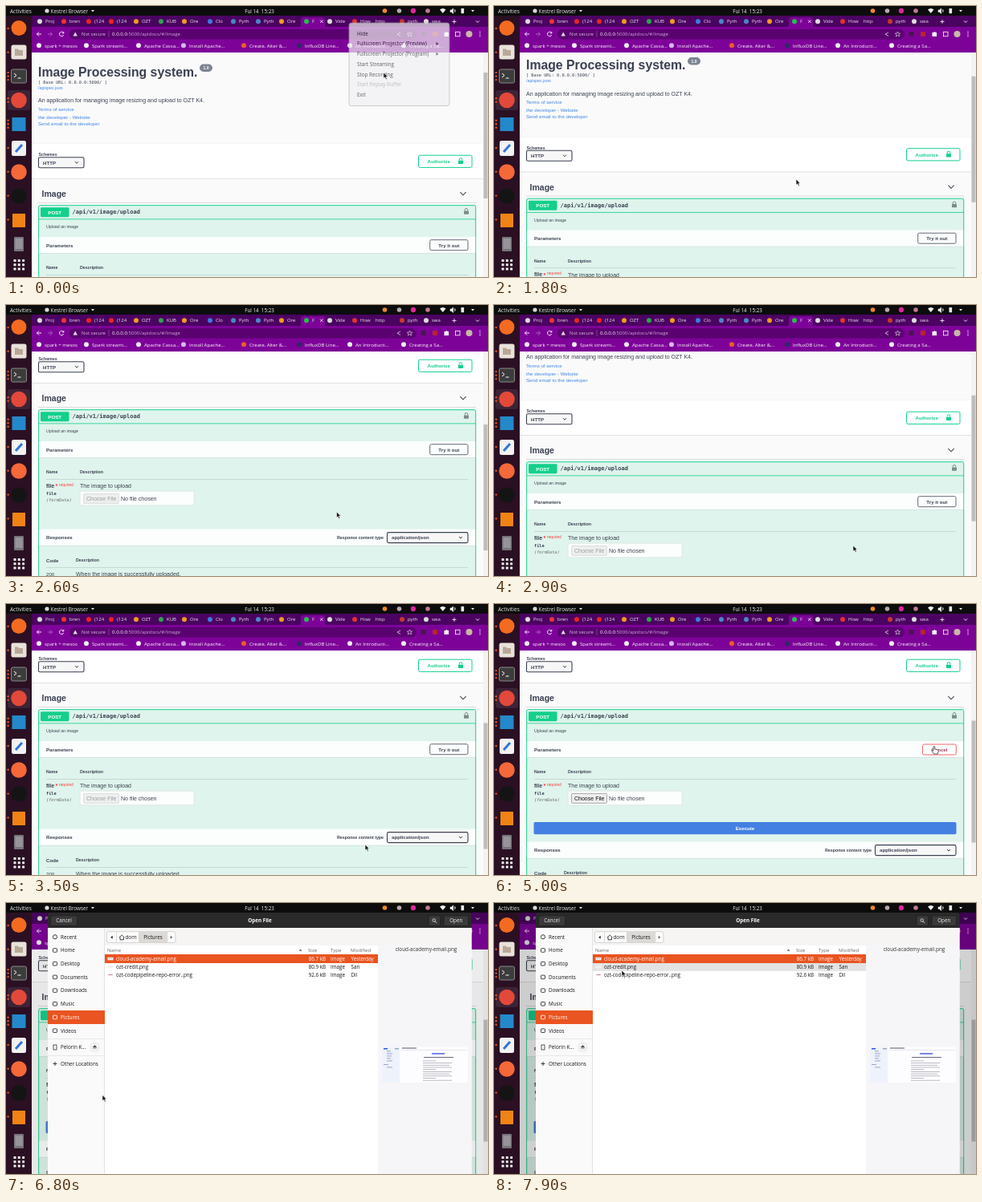
Animation of 600x338 px, one loop 8000 ms. Source, as an HTML page:

```html
<!DOCTYPE html>
<html lang="en">
<head>
<meta charset="utf-8">
<title>Screen recording</title>
<style>
html, body { margin: 0; width: 100%; height: 100%; overflow: hidden; background: #000; }
svg { display: block; width: 600px; height: 338px; }
text { white-space: pre; }
.ui { font-family: "Open Sans", "Noto Sans", sans-serif; }
.page { font-family: "Liberation Sans", Arial, sans-serif; }
.mono { font-family: "DejaVu Sans Mono", monospace; }
.b { font-weight: 700; }
.d { font-weight: 500; }
.m { text-anchor: middle; }
.e { text-anchor: end; }
</style>
</head>
<body>
<svg id="stage" viewBox="0 0 600 338"></svg>
<script>
const INK = '#3b4151', GREEN = '#13d08c', LINK = '#4086e6', ORANGE = '#e95420', DARK = '#161616';

// Drawing helpers, each returning markup
const text = (x, y, s, size, fill = INK, cls = '', more = '') =>
  `<text x="${x}" y="${y}" font-size="${size}" fill="${fill}" class="${cls}" ${more}>${s.replace(/&/g, '&amp;')}</text>`;
const rect = (x, y, w, h, fill, more = '') =>
  `<rect x="${x}" y="${y}" width="${w}" height="${h}" fill="${fill}" ${more}/>`;
const box = (x, y, w, h, fill, stroke, sw = 1, r = 1.8) =>
  rect(x, y, w, h, fill, `stroke="${stroke}" stroke-width="${sw}" rx="${r}"`);
const dot = (x, y, r, fill) => `<circle cx="${x}" cy="${y}" r="${r}" fill="${fill}"/>`;
const path = (d, stroke, sw = 1, fill = 'none') =>
  `<path d="${d}" stroke="${stroke}" stroke-width="${sw}" fill="${fill}"/>`;
const group = (id, body, more = '') => `<g id="${id}" ${more}>${body}</g>`;
const chevron = (x, y, r, color, sw = 1) => path(`M${x - r} ${y - r / 2}l${r} ${r}l${r} ${-r}`, color, sw);
const lock = (x, y, color) =>
  rect(x - 3, y - 1, 6, 4.2, color, 'rx=".6"') + path(`M${x - 1.8} ${y - 1}v-1.2a1.8 1.8 0 0 1 3.6 0v1.2`, color, 1);
const select = (x, y, w, s) =>
  box(x, y, w, 13, '#f7f7f7', INK, 1.1) + text(x + 5.5, y + 8.8, s, 6.15, INK, 'b') + chevron(x + w - 9, y + 6.5, 2, '#222', .9);

function desktop() {
  let s = rect(0, 0, 600, 12, '#0c0c0c') + rect(0, 12, 32, 326, '#2b1023');
  s += text(5, 8.6, 'Activities', 6.5, '#e8e8e8');
  s += dot(51, 6, 2.6, '#d8d8d8') + text(55.5, 8.6, 'Kestrel Browser', 6.4, '#e8e8e8') + path('M106 5h4l-2 2.6z', 'none', 0, '#e8e8e8');
  s += text(315.5, 8.6, 'Ful 14  15:23', 6.25, '#f0f0f0', 'm');
  s += dot(471.5, 6, 2.8, '#f08a24') + dot(489.5, 6, 2.8, '#b8aaaa') + dot(507, 6, 3.2, '#e0249b') + dot(525, 6, 2.8, '#c07a96');
  s += path('M540 4.5a6 6 0 0 1 7.500 0l-3.750 4.500z', 'none', 0, '#eee');
  s += path('M553 5h1.5l2.2-2v6.5l-2.2-2h-1.5zM558.5 4q1.800 2 0 4', '#eee', .6, '#eee');
  s += rect(566.5, 3, 3.6, 6.2, '#eee', 'rx=".6"') + path('M579 5h4l-2 2.6z', 'none', 0, '#eee');

  s += rect(2, 105, 28, 25, '#3d2336', 'rx="3"');
  const icons = [dot(16, 27.5, 9.5, '#f26b21'),
    rect(6.5, 48.5, 19, 18, '#e9e2da', 'rx="2.5"') + path('M11 53.500h4l1 1.500h5v7h-10z', 'none', 0, '#b9a898'),
    rect(6.5, 79, 19, 17, '#3c3c3c', 'rx="2" stroke="#888"') + path('M10 84l3 2.5l-3 2.5M14.5 90h4', '#fff', 1),
    dot(16, 117.5, 9.8, '#e2493b'),
    rect(7.5, 139, 17, 17, '#2489ca'),
    rect(7, 168, 18, 19, '#f2f2f2', 'rx="2.5"') + path('M12 182l8-9', '#3275d8', 3),
    dot(16, 207, 9.8, '#f4683a'), dot(16, 237, 9.8, '#141414'), rect(8, 259, 16, 17, '#f08316'),
    rect(10, 288, 12, 18, '#77747a', 'rx="1"') + rect(11.5, 290, 9, 13, '#96949a')];
  s += icons.join('');
  [1, 1, 3, 2, 3, 1, 1, 1, 1].forEach((n, i) => {
    for (let k = 0; k < n; k++) s += dot(2.6, 28 + i * 29.8 + (k - (n - 1) / 2) * 4.5, 1.2, ORANGE);
  });
  for (let i = 0; i < 9; i++) s += rect(9.5 + i % 3 * 5.3, 316 + (i / 3 | 0) * 5.3, 3, 3, '#f2f2f2', 'rx=".6"');
  return s;
}

function browser() {
  let s = rect(32, 12, 568, 15, '#4b0361') + rect(32, 26, 568, 32, '#7d0398');
  s += path('M364 27q3 0 3-4v-6q0-3 3-3h24q3 0 3 3v6q0 4 3 4z', 'none', 0, '#7d0398');
  const tabs = [[49, 'Proj', '#ddd'], [79, 'bren', '#e33'], [110, '(124', '#e22'], [138, '(124', '#e22'],
    [169, 'OZT', '#f29a1f'], [200, 'KUB', '#2ca44f'], [229, 'Ore', '#f29a1f'], [261, 'Clo', '#3c7be0'],
    [290, 'Pyth', '#4a86c8'], [321, 'Pyth', '#4a86c8'], [350, 'Ore', '#f29a1f'], [381, 'F', '#25c04a'],
    [410, 'Vide', '#ddd'], [441, 'How', '#d33'], [460, 'http', '#aaa'], [500, 'pyth', '#c8372b'], [530, 'swa', '#ddd']];
  for (const [x, name, color] of tabs) {
    if (name != 'http') s += dot(x - 7, 19.3, 3, color);
    s += text(x, 21.4, name, 6, '#f1e6f4');
  }
  s += path('M391 17.5l3.5 3.5m0-3.5l-3.5 3.5M555.5 19.5h5m-2.5-2.5v5', '#fff', .8) + chevron(587, 19.5, 2, '#fff', .9);

  s += path('M44 35h-5.5m2.5-2.5l-2.5 2.5l2.5 2.5', '#fff', .9) + path('M52 35h5.5m-2.5-2.5l2.5 2.5l-2.5 2.5', '#b566c8', .9);
  s += path('M71.5 33.5a2.7 2.7 0 1 0 .2 2.6M71.8 32v2h-2', '#fff', .9);
  s += rect(79, 29, 432, 12.5, '#5b0271', 'rx="6.2"');
  s += path('M83.5 37.5l2.7-5l2.7 5z', 'none', 0, '#ddd') + text(94, 37.3, 'Not secure', 5.9, '#d7c2dd');
  s += path('M128 31v8', '#9a62a8', .6);
  s += text(132, 37.4, '<tspan fill="#fff">0.0.0.0</tspan>:5000/apidocs/#/Image', 6.15, '#cbaad4');
  s += path('M491 33l-4 2.2l4 2.2', '#ddd', .8) + path('M502.5 32l1 2.2h2.2l-1.8 1.5l.7 2.3l-2.1-1.4l-2.1 1.4l.7-2.3l-1.8-1.5h2.2z', '#eee', .6);
  s += rect(516.5, 32, 6, 6, '#4a1450', 'rx="1"') + rect(531, 32, 6, 6, '#b52530', 'rx="1"');
  s += path('M545.5 33h2q1-2 2 0h1.5v5h-5.5z', 'none', 0, '#fff') + rect(559.5, 32.3, 5.5, 5.5, 'none', 'stroke="#fff" stroke-width=".8"');
  s += dot(576.5, 35, 4, '#c8b8a4') + [32.5, 35, 37.5].map(y => dot(590, y, .7, '#fff')).join('');

  const marks = [[48, 'spark + mesos', '#eee'], [107, 'Spark streami…', '#eee'], [172, 'Apache Cassa…', '#eee'],
    [228, 'Install Apache…', '#d8b8f0'], [303, 'Create, Alter &…', '#ee5b25'], [372, 'InfluxDB Line…', '#2a2a66'],
    [435, 'An Introducti…', '#eee'], [502, 'Creating a Sa…', '#eee']];
  for (const [x, name, color] of marks) s += dot(x - 7, 49.2, 3, color) + text(x, 51.5, name, 6.1, '#fff');
  return s;
}

function page() {
  let s = text(40, 87.5, 'Image Processing system.', 15.81, INK, 'b');
  s += rect(241, 72.5, 16, 9.5, '#7d8492', 'rx="4.7"') + text(249, 79, '1.0', 5, '#fff', 'b m');
  s += text(40, 96.5, '[ Base URL: 0.0.0.0:5000/ ]', 5.27, INK, 'mono') + text(40, 103.5, '/apispec.json', 5.27, LINK);
  s += text(40, 120.4, 'An application for managing image resizing and upload to OZT K4.', 7.03);
  s += text(40, 130.6, 'Terms of service', 6.15, LINK) + text(40, 140.7, 'the developer - Website', 6.15, LINK);
  s += text(40, 148.6, 'Send email to the developer', 6.15, LINK);

  s += rect(32, 172, 562, 43.5, '#fff') + rect(32, 215, 562, 1, '#e2e2e2') + rect(32, 171.5, 562, .5, '#eee');
  s += text(40.5, 187, 'Schemes', 5.27, INK, 'b') + select(40.5, 188.7, 56.5, 'HTTP');
  s += box(513.5, 186.2, 66.5, 15.2, '#fff', GREEN) + text(524.5, 196, 'Authorize', 6.15, GREEN, 'b') + lock(566, 193.7, GREEN);

  s += text(44.5, 238.2, 'Image', 10.54, INK, 'b') + chevron(569, 234, 3.6, INK, 1.1) + rect(40, 245.2, 545, .6, '#c4c6ca');
  s += box(40.7, 248.7, 544, 260, '#dff4ec', GREEN) + rect(41, 265.5, 543.5, .8, GREEN);
  s += rect(43, 251.2, 35.5, 12, GREEN, 'rx="1.4"') + text(60.7, 259.5, 'POST', 6.15, '#fff', 'b m');
  s += text(82.5, 259.3, '/api/v1/image/upload', 7.03, INK, 'mono b') + lock(573, 256.5, '#7c8c8c');
  s += text(50, 277.2, 'Upload an image', 5.27);
  s += rect(41.2, 288, 543, 20.5, '#fbfefd') + rect(41.2, 308.2, 543, .8, '#d0e2dc');
  s += text(50, 300.7, 'Parameters', 6.15, INK, 'b');
  s += group('tryIt', box(527.7, 291.7, 47.3, 13, '#fbfefd', '#666b78') + text(551.3, 300.6, 'Try it out', 6.15, INK, 'b m'));
  s += group('cancel', box(533.5, 292, 41.8, 13, '#fbfefd', '#f0686c') + text(554.4, 300.7, 'Cancel', 6.15, '#a93d5c', 'b m'));

  s += text(50, 328.4, 'Name', 5.27, INK, 'b') + text(92, 328.4, 'Description', 5.27, INK, 'b') + rect(50, 335, 525, .6, '#b5c8c3');
  s += text(50, 345.9, 'file', 7.03, INK, 'b') + text(61.5, 346.2, '*', 7, '#f33', 'b') + text(66, 343.6, 'required', 4.9, '#f44');
  s += text(50, 355, 'file', 5.27, INK, 'mono b') + text(50, 363.2, '(formData)', 5.27, '#6b6b6b', 'mono', 'font-style="italic"');
  s += text(92, 346, 'The image to upload', 7.03) + box(92.2, 350.2, 142, 17.6, '#fbfefd', '#d5dedb', .6);
  s += group('pickOff', box(96.5, 353.4, 44, 12, '#eeeeee', '#ccc', .6, 1) + text(100, 361.8, 'Choose File', 7.03, '#9aa0a0'));
  s += group('pickOn', box(96.5, 353.4, 44, 12, '#eeeeee', '#777', .6, 1) + text(100, 361.8, 'Choose File', 7.03, '#111'));
  s += text(143, 361.8, 'No file chosen', 7.03);
  s += group('execute', rect(49.5, 389, 526, 15.3, '#4480e2', 'rx="1.8"') + text(312.5, 398.8, 'Execute', 6.15, '#fff', 'b m'));

  s += group('responses', rect(41.2, 397.6, 543, 20.4, '#fbfefd') + rect(41.2, 417.8, 543, .8, '#d0e2dc') +
    text(50, 410.2, 'Responses', 6.15, INK, 'b') + text(470, 409.8, 'Response content type', 5.27, INK, 'b e') +
    select(474.5, 401.6, 100.5, 'application/json') +
    text(50, 438.6, 'Code', 6.15, INK, 'b') + text(87, 438.4, 'Description', 5.27, INK, 'b') + rect(50, 445, 525, .6, '#b5c8c3') +
    text(50, 456.3, '200', 6.15) + text(87, 456.4, 'When the image is successfully uploaded.', 7.03));
  return s;
}

function menu() {
  let s = box(427, 21, 125, 103.5, '#f1f0f2', '#aaa', .8, 3);
  ['Hide', 'Fullscreen Projector (Preview)', 'Fullscreen Projector (Program)', 'Start Streaming',
    'Stop Recording', 'Start Replay Buffer', 'Exit'].forEach((name, i) => {
    s += text(437, 36.6 + i * 12.75, name, 6.35, i == 5 ? '#a4a4a4' : '#222');
    if (i == 1 || i == 2) s += path(`M535.5 ${32.3 + i * 12.75}l3 2l-3 2z`, 'none', 0, '#444');
  });
  return s;
}

function preview() {
  let s = rect(468, 179.5, 107, 44.5, '#fdfdff') + rect(468, 179.5, 22, 44.5, '#eef2fb');
  s += rect(493, 180.5, 18, 1, '#556') + rect(492, 183, 82, .5, '#ccd') + rect(470, 181, 5, 1.5, '#2d5be0') + rect(484, 181, 5, 1.5, '#9ab');
  for (let i = 0; i < 5; i++) s += rect(474, 184.5 + i * 3, 5 + i * 2 % 3, .8, '#8a96b8');
  s += rect(470, 201, 6, .8, '#8a96b8') + rect(474, 204.5, 7, .8, '#8a96b8');
  s += rect(530, 187, 16, 1.8, '#6a7cec') + rect(520, 192, 37, 1, '#667');
  for (let i = 0; i < 10; i++) s += rect(519, 196.5 + i * 2.7, i % 4 == 0 ? 16 : 33 + i % 2 * 3, .8, '#aaaab4');
  return s;
}

function dialog() {
  let s = rect(52, 31, 527.5, 307, '#fff') + rect(52, 31, 71, 307, '#fafafa') + rect(122.3, 31, .7, 307, '#d8d8d8');
  s += path('M52 31v-15.5q0-3.5 3.5-3.5h520.5q3.5 0 3.5 3.5v15.5z', 'none', 0, '#2a2a2a');
  for (const [x, w] of [[55.5, 33], [526, 14.5], [545, 30.5]]) s += box(x, 15.8, w, 12.6, '#3a3a3a', '#1c1c1c', .7, 2);
  s += text(72, 24.3, 'Cancel', 6.3, '#f2f2f2', 'm') + text(316, 24.3, 'Open File', 6.3, '#fff', 'b m') + text(560.3, 24.3, 'Open', 6.3, '#f2f2f2', 'm');
  s += `<circle cx="532.7" cy="21.5" r="1.8" fill="none" stroke="#eee" stroke-width=".8"/>` + path('M534 22.8l2 2', '#eee', .9);

  s += rect(52, 134, 71, 17, ORANGE);
  ['Recent', 'Home', 'Desktop', 'Documents', 'Downloads', 'Music', 'Pictures', 'Videos'].forEach((name, i) => {
    const y = 42.3 + i * 16.7, color = i == 6 ? '#fff' : DARK;
    s += i ? rect(58.5, y - 2.3, 5, 4.6, 'none', `stroke="${color}" stroke-width=".8" rx=".8"`)
           : `<circle cx="61" cy="${y}" r="2.6" fill="none" stroke="${DARK}" stroke-width=".8"/>`;
    s += text(68, y + 2.3, name, 6.3, color, 'd');
  });
  s += rect(52, 169.3, 70, .6, '#ddd') + rect(52, 190, 70, .6, '#ddd');
  s += rect(59, 177, 4, 6, 'none', `stroke="${DARK}" stroke-width=".7"`) + text(68, 182.3, 'Pelorin K…', 6.3, DARK, 'd');
  s += box(105.5, 175, 10, 10, '#f4f4f4', '#ddd', .6) + path('M108.2 180l2.3-2.5l2.3 2.5zM108.2 181.3h4.6', '#444', .5, '#444');
  s += path('M58.5 200.5h5m-2.5-2.5v5', DARK, .8) + text(68, 203, 'Other Locations', 6.3, DARK, 'd');

  s += rect(123, 31, 456.5, 22, '#f6f5f4') + box(125.5, 35.7, 85.5, 13.8, '#fbfbfb', '#c8c5c2', .7, 2) + rect(165.5, 36, 35, 13.2, '#dcd9d6');
  s += [137, 165.5, 200.5].map(x => rect(x, 36, .6, 13.2, '#c8c5c2')).join('');
  s += path('M132.7 40.8v4l-2.5-2z', 'none', 0, '#222') + path('M204.7 40.8v4l2.5-2z', 'none', 0, '#666');
  s += path('M141 43l3.2-3l3.2 3M142 42.5v3.3h4.4v-3.3', DARK, .8) + text(148.5, 45.2, 'dorn', 6.3, DARK, 'd') + text(183, 45.2, 'Pictures', 6.3, DARK, 'd m');

  s += rect(123, 53, 340, 285, '#fff') + rect(463, 53, 116.5, 285, '#f6f5f7') + rect(123, 64, 340, .5, '#ddd');
  s += text(126, 61, 'Name', 6.1, '#666') + path('M364.5 60h4l-2-2.8z', 'none', 0, '#777') + text(376, 61, 'Size', 6.1, '#666') + text(404, 61, 'Type', 6.1, '#666') + text(429, 61, 'Modified', 6.1, '#666');
  s += group('hover', rect(123, 0, 340, 10, '#e3e3e3')) + rect(123, 64, 340, 11, ORANGE);
  [['cloud-academy-email.png', '86.7 kB', 'Yesterday'], ['ozt-credit.png', '80.9 kB', 'San'],
    ['ozt-codepipeline-repo-error..png', '92.6 kB', 'Dil']].forEach(([name, size, day], i) => {
    const y = 71.8 + i * 10.1, color = i ? DARK : '#fff';
    s += rect(126.5, y - 4, 7, 3.5, '#f6f6f6') + rect(127.5, y - 3, 5, .8, ['#b8b8c8', '#ddd', '#d66'][i]);
    s += text(137, y, name, 6.25, color, 'd') + text(398, y, size, 6.25, color, 'd e') + text(404, y, 'Image', 6.25, color, 'd') + text(429.5, y, day, 6.25, color, 'd');
  });
  return s + text(523, 59.8, 'cloud-academy-email.png', 6.4, '#333', 'm') + preview();
}

const arrow = path('M0 0v7.3l1.7-1.5l1.3 2.7l1.3-.6l-1.3-2.6h2.3z', '#fff', .6, '#151515');
const hand = path('M-1 0q1-1 1.8 0v3l3.5.8q1 .4.8 1.6l-.8 3.6h-4.6l-2.7-3.7q.2-1.3 1.5-.4l.5.4z', '#222', .7, '#fff');

const stage = document.getElementById('stage');
stage.innerHTML =
  `<clipPath id="view"><rect x="32" y="57.5" width="568" height="280.5"/></clipPath>` +
  `<g clip-path="url(#view)">${rect(32, 57, 568, 281, '#fafafa')}${group('page', page(), 'class="page"')}` +
  `${rect(594, 57, 6, 281, '#f3f3f3')}<rect id="thumb" x="594.5" width="5" fill="#bdbdbd"/></g>` +
  `<g class="ui">${browser()}${desktop()}${group('menu', menu())}` +
  group('shade', rect(32, 12, 568, 326, '#000')) + group('modal', dialog()) + '</g>' +
  group('cursor', group('arrow', arrow) + group('hand', hand));

const el = {};
for (const node of stage.querySelectorAll('[id]')) el[node.id] = node;
const show = (id, on) => el[id].setAttribute('visibility', on ? 'visible' : 'hidden');

// Keys are [time, value...]; easing between keys is a smooth step unless linear
function at(keys, t, linear) {
  let i = 0;
  while (i < keys.length - 2 && t >= keys[i + 1][0]) i++;
  const a = keys[i], b = keys[i + 1];
  let u = Math.min(1, Math.max(0, (t - a[0]) / (b[0] - a[0])));
  if (!linear) u = u * u * (3 - 2 * u);
  return a.slice(1).map((v, k) => v + (b[k + 1] - v) * u);
}

const SCROLL = [[1700, 0], [1800, 8.5], [2100, 105], [2200, 118], [2600, 118], [2900, 53], [3100, 53], [3400, 117]];
const POINTER = [[800, 470, 83], [1700, 376, 216], [2300, 376, 216], [2900, 447, 300], [3500, 447, 300],
  [4400, 548, 178], [5000, 548, 178], [5600, 330, 232], [6500, 120, 239.5], [6900, 120, 239.5], [7900, 159, 84]];
const MENU = [[0, .7], [100, .35], [200, .1], [300, 0]];
const SHADE = [[6600, .02], [7200, .18]];

function draw(ms) {
  const t = Math.floor(ms % 8000 / 100) * 100;
  const [scroll] = at(SCROLL, t, true), [x, y] = at(POINTER, t);
  const open = t >= 4800, modal = t >= 6600;

  el.page.setAttribute('transform', `translate(0 ${-scroll})`);
  el.thumb.setAttribute('y', 83 + scroll * .56 - (open ? 3 : 0));
  el.thumb.setAttribute('height', open ? 152 : 157);
  el.menu.setAttribute('opacity', at(MENU, t, true)[0]);

  for (const id of ['cancel', 'pickOn', 'execute']) show(id, open);
  for (const id of ['tryIt', 'pickOff']) show(id, !open);
  el.responses.setAttribute('transform', `translate(0 ${open ? 16 : 0})`);

  el.shade.setAttribute('opacity', modal ? at(SHADE, t, true)[0] : 0);
  el.modal.setAttribute('opacity', modal ? Math.min(1, (t - 6500) / 200) : 0);
  const row = Math.floor((y - 64.5) / 10.1);
  show('hover', modal && x > 123 && (row == 1 || row == 2));
  el.hover.setAttribute('transform', `translate(0 ${64.7 + row * 10.1})`);

  const pointing = !modal && t > 3600 && x > 528 && x < 575 && y > 174 && y < 188;
  el.cursor.setAttribute('transform', `translate(${x} ${y})`);
  show('hand', pointing);
  show('arrow', !pointing);
}

const start = performance.now();
function tick() {
  draw(performance.now() - start);
  requestAnimationFrame(tick);
}
tick();
</script>
</body>
</html>
```
